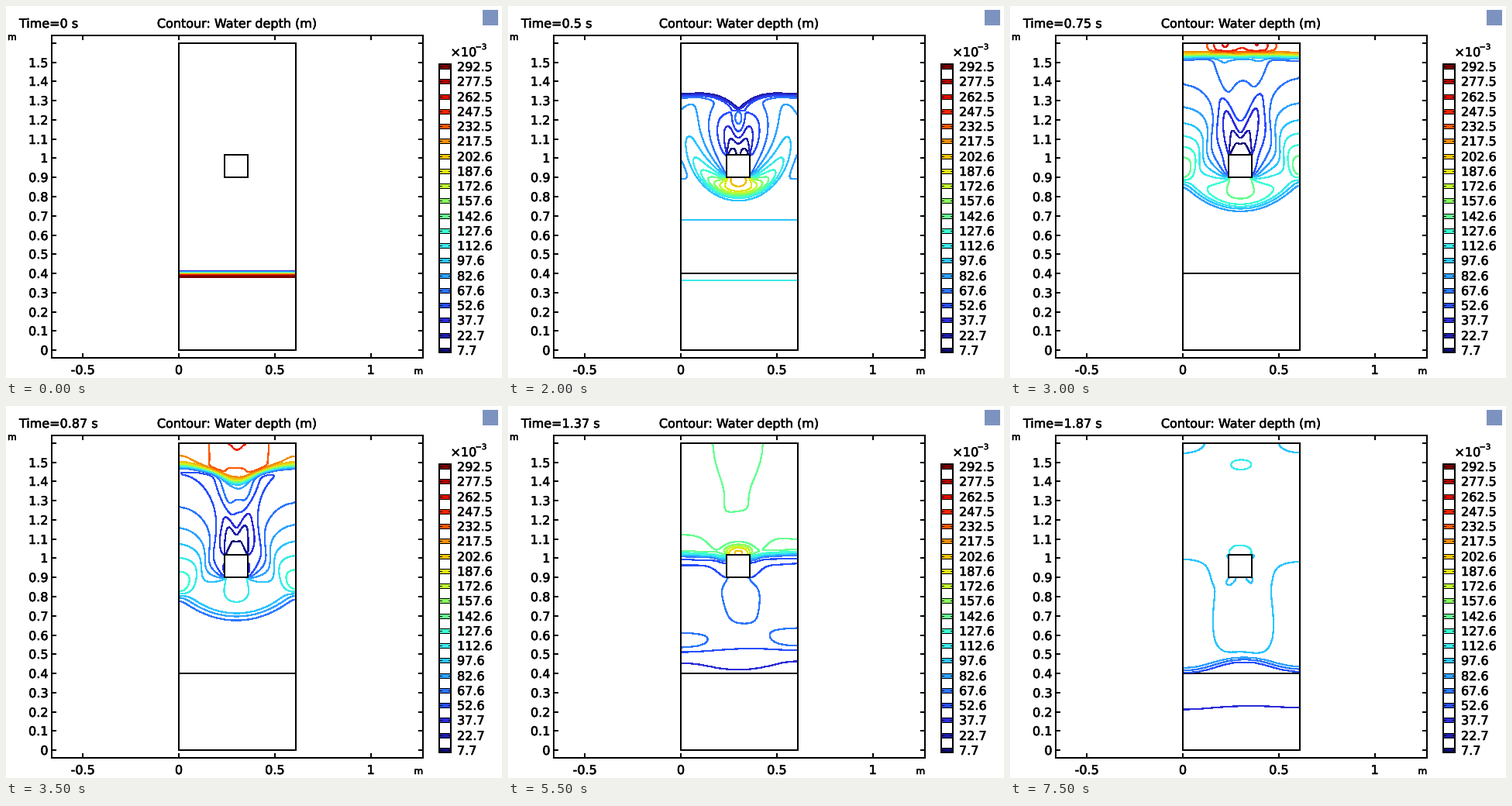
Recreate the animation shown at these times as a matplotlib script. Size 640x480 px, loop 8000 ms.

```python
import numpy as np
import matplotlib.pyplot as plt
from matplotlib.animation import FuncAnimation
from matplotlib.colors import LinearSegmentedColormap
from matplotlib.patches import Rectangle
from matplotlib.patheffects import withStroke

DPI = 100
PX = 72 / DPI                     # points per pixel
plt.rcParams.update({
    "font.family": "DejaVu Sans",
    "lines.antialiased": False,
    "patch.antialiased": False,
})

# Dam break around a square column: shallow water, finite volumes
G, DX = 9.81, 0.01
NX, NY = 61, 160
FRAMES, STEPS = 16, 160
DT = 0.125 / STEPS
SLOPE = 0.4                       # share of the limited slope used at faces
ROWS, COLS = slice(90, 102), slice(24, 36)    # cells of the column


def sweep(h, n, t, wall):
    """Update along axis 0; n and t are normal and tangential momentum."""
    wl, wr = wall[:-1], wall[1:]
    inner = ~(wl | wr)

    def sides(a, sign=1):
        d = (a[1:] - a[:-1]) * inner
        s = np.zeros_like(a)
        s[1:-1] = SLOPE / 2 * (
            np.maximum(np.minimum(d[:-1], d[1:]), 0)
            + np.minimum(np.maximum(d[:-1], d[1:]), 0))
        left, right = a[:-1] + s[:-1], a[1:] - s[1:]
        return np.where(wl, sign * right, left), np.where(wr, sign * left, right)

    (hl, hr), (nl, nr), (tl, tr) = sides(h), sides(n, -1), sides(t)
    ul, ur = nl / hl, nr / hr
    speed = np.maximum(np.abs(ul) + np.sqrt(G * hl),
                       np.abs(ur) + np.sqrt(G * hr))
    fh = nl + nr - speed * (hr - hl)
    fn = (nl * ul + nr * ur + G / 2 * (hl * hl + hr * hr)
          - speed * (nr - nl))
    ft = tl * ul + tr * ur - speed * (tr - tl)
    return [(f[:-1] - f[1:]) / 2 for f in (fh, fn, ft)]


def surface(h):
    """Depth extended to the walls and into the column for contouring."""
    z = h[1:-1, 1:-1].copy()
    z[90:96, COLS] = z[89, COLS]
    z[96:102, COLS] = z[102, COLS]
    z[ROWS, 24] = z[ROWS, 23]
    z[ROWS, 35] = z[ROWS, 36]
    return np.pad(z, 1, mode="edge")


def simulate():
    wall = np.ones((NY + 2, NX + 2), bool)
    wall[1:-1, 1:-1] = False
    wall[1:-1, 1:-1][ROWS, COLS] = True
    wet = ~wall[1:-1, 1:-1] * (DT / DX)

    y = (np.arange(NY + 2) - 0.5) * DX
    ramp = np.clip((0.4125 - y) / 0.025, 0, 1)
    h = np.repeat((0.01 + 0.29 * ramp)[:, None], NX + 2, axis=1)
    h[wall] = 1
    p, q = np.zeros_like(h), np.zeros_like(h)

    depths = [surface(h)]
    for _ in range(FRAMES - 1):
        for _ in range(STEPS):
            yh, yq, yp = sweep(h, q, p, wall)
            xh, xp, xq = sweep(h.T, p.T, q.T, wall.T)
            for a, dy, dx in ((h, yh, xh), (p, yp, xp), (q, yq, xq)):
                a[1:-1, 1:-1] += wet * (dy[:, 1:-1] + dx.T[1:-1])
        depths.append(surface(h))
    return depths


DEPTHS = simulate()

# Stage in pixel coordinates, y downwards
fig = plt.figure(figsize=(6.4, 4.8), dpi=DPI, facecolor="white")
ax = fig.add_axes([0, 0, 1, 1])
ax.set_xlim(0, 640)
ax.set_ylim(480, 0)
ax.autoscale(False)
ax.axis("off")

SCALE = 247.7                     # pixels per metre


def sx(x):
    return 223 + SCALE * x


def sy(y):
    return 444.18 - SCALE * y


HEAVY = [withStroke(linewidth=0.6 * PX, foreground="black")]


def text(x, y, s, size=16, ha="left"):
    return ax.text(x, y, s, fontsize=size * PX, ha=ha, va="baseline",
                   color="black", path_effects=HEAVY)


def line(x0, y0, x1, y1, width=2, z=2):
    ax.plot([x0, x1], [y0, y1], color="black", lw=width * PX, zorder=z,
            solid_capstyle="butt")


def box(x0, y0, x1, y1, face="none", edge="black", width=2, z=5):
    ax.add_patch(Rectangle((x0, y0), x1 - x0, y1 - y0, facecolor=face,
                           edgecolor=edge, lw=width * PX, zorder=z))


# Axes frame, ticks and labels
LEFT, TOP, RIGHT, BOTTOM = 59, 38, 538, 454
box(LEFT, TOP, RIGHT, BOTTOM)
for v in (-0.5, 0, 0.5, 1):
    x = sx(v)
    line(x, TOP, x, TOP + 6)
    line(x, BOTTOM - 6, x, BOTTOM)
    text(x, 475, f"{v:g}", ha="center")
for i in range(17):
    y = sy(i / 10)
    line(LEFT, y, LEFT + 6, y)
    line(RIGHT - 6, y, RIGHT, y)
    if i < 16:
        text(54.5, round(y) + 6, f"{i / 10:g}", ha="right")
text(2, 44, "m", 12)
text(526.5, 475, "m", 12)
text(298.5, 28, "Contour: Water depth (m)", ha="center")
clock = text(17, 28, "")

# Channel, gate and column
box(sx(0), sy(1.6), sx(0.61), sy(0))
line(sx(0), sy(0.4), sx(0.61), sy(0.4))
box(sx(0.24), sy(1.02), sx(0.36), sy(0.9), face="white")

# Colour legend
LEVELS = 7.67 + 14.991 * np.arange(20)
cmap = LinearSegmentedColormap.from_list("depth", [
    (0.00, "#101078"), (0.10, "#2c2cd8"), (0.16, "#2850ff"),
    (0.26, "#30a0ff"), (0.32, "#2cc8ff"), (0.37, "#3cebeb"),
    (0.42, "#3cffd2"), (0.47, "#64ff96"), (0.53, "#8cff5a"),
    (0.58, "#c0fa32"), (0.63, "#e1e614"), (0.69, "#f0be0a"),
    (0.74, "#f08c0a"), (0.79, "#fa5a00"), (0.84, "#f02800"),
    (0.90, "#dc0a00"), (1.00, "#780000")])
COLORS = [cmap(v) for v in np.linspace(0, 1, 20)]

for i, (level, color) in enumerate(zip(LEVELS, COLORS)):
    y = round(444 - 366 * i / 19)
    box(559, y - 3, 574, y + 3, face=color, width=1, z=3)
    line(559, y, 562, y, 1, 4)
    line(571, y, 574, y, 1, 4)
    text(582, y + 6, f"{level:.1f}")
box(559, 75, 574, 447)
text(573.5, 65, "×10")
text(605.5, 56, "\u22123", 10)

box(615, 5, 635, 25, face="#7d93bf", edge="none")

GX = sx(np.r_[0, (np.arange(NX) + 0.5) * DX, NX * DX])
GY = sy(np.r_[0, (np.arange(NY) + 0.5) * DX, NY * DX])
drawn = []


def update(k):
    while drawn:
        drawn.pop().remove()
    drawn.append(ax.contour(GX, GY, DEPTHS[k] * 1000, levels=LEVELS,
                            colors=COLORS, linewidths=1.2 * PX,
                            antialiased=False, zorder=3))
    clock.set_text(f"Time={int(k * 12.5) / 100:g} s")
    return drawn + [clock]


anim = FuncAnimation(fig, update, frames=FRAMES, interval=500,
                     init_func=lambda: update(0), repeat=True,
                     repeat_delay=0, blit=False)
plt.show()
```
